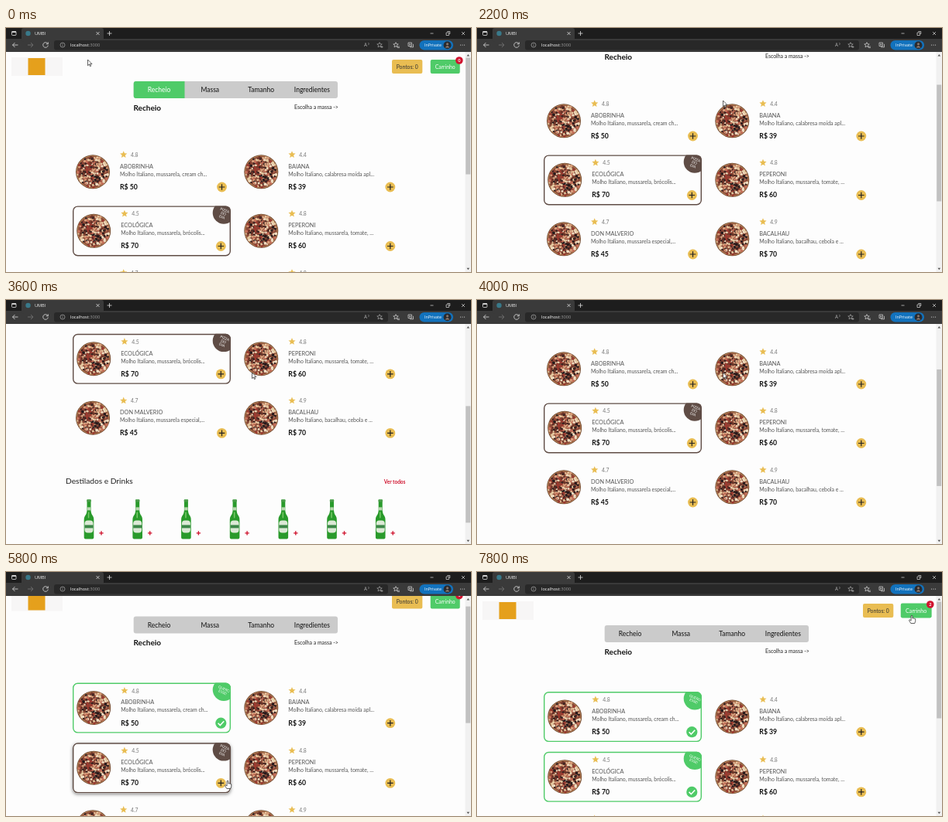
These frames come from a looping animation (600x316 px, 8000 ms). An HTML page:

```html
<!DOCTYPE html>
<html lang="pt-BR">
<head>
<meta charset="utf-8">
<title>Pizzaria</title>
<style>
html, body { margin: 0; width: 100%; height: 100%; overflow: hidden; background: #fdfdfd; }
svg { display: block; width: 100%; height: 100%; font-family: Lato, "Open Sans", sans-serif; }
.ui { font-family: "Open Sans", "Noto Sans", sans-serif; }
</style>
</head>
<body>
<svg viewBox="0 0 600 316">
  <defs id="defs"></defs>
  <g id="page"></g>
  <g id="chrome" class="ui"></g>
  <g id="pointer"></g>
</svg>
<script>
const LOOP = 8000, STEP = 200;
const BROWN = '#5f4c45', GREEN = '#4fcb68', GOLD = '#e9bd52', RED = '#d0142f';
const FIRST_PICK = 5200, SECOND_PICK = 6200;
const CARD = { width: 204, height: 65, radius: 6.5 };

const MENU = [
  ['ABOBRINHA', 'mussarela, cream ch...', 50, 4.8], ['BAIANA', 'calabresa moída apl...', 39, 4.4],
  ['ECOLÓGICA', 'mussarela, brócolis...', 70, 4.5], ['PEPERONI', 'mussarela, tomate, ...', 60, 4.8],
  ['DON MALVERIO', 'mussarela especial,...', 45, 4.7], ['BACALHAU', 'bacalhau, cebola e ...', 70, 4.9]
];
const DRINK_PRICES = [8, 39, 70, 60, 45, 70, 70];

// Keyframes: [time, value, ...]
const SCROLL = [[1900, 0], [2200, 66], [2700, 209], [3500, 209], [4000, 97], [4400, 11.5], [6600, 11.5], [7000, 0]];
const POINTER = [[400, 105.5, 41], [1400, 317.5, 94], [4200, 317.5, 94], [4700, 284.5, 192.5], [4800, 284.5, 192.5],
  [5000, 280, 193], [5300, 280, 193], [5700, 286, 270], [6400, 286, 270], [7300, 561, 56]];
const HOVER = {
  0: [[4800, 0], [5000, .8], [5400, .8], [5700, 0]],
  1: [[4400, 0], [4600, .5], [4800, .3], [5000, 0]],
  2: [[5400, 0], [5700, 1], [6500, 1], [6800, 0]]
};

function track(keys, time) {
  const next = keys.findIndex(k => k[0] > time);
  if (next === 0) return keys[0].slice(1);
  if (next < 0) return keys[keys.length - 1].slice(1);
  const a = keys[next - 1], b = keys[next];
  const p = (time - a[0]) / (b[0] - a[0]);
  return a.slice(1).map((v, i) => v + (b[i + 1] - v) * p);
}

// Text is placed by its vertical middle.
const text = (x, y, size, fill, str, extra = '') =>
  `<text x="${x}" y="${y + size * .36}" font-size="${size}" fill="${fill}" ${extra}>${str}</text>`;
const rect = (x, y, w, h, fill, r = 0, extra = '') =>
  `<rect x="${x}" y="${y}" width="${w}" height="${h}" rx="${r}" fill="${fill}" ${extra}/>`;
const circle = (x, y, r, fill, extra = '') => `<circle cx="${x}" cy="${y}" r="${r}" fill="${fill}" ${extra}/>`;
const line = (d, color, width = .8, extra = '') =>
  `<path d="${d}" fill="none" stroke="${color}" stroke-width="${width}" ${extra}/>`;
const use = (id, x, y) => `<use href="#${id}" x="${x}" y="${y}"/>`;
const BOLD = 'font-weight="700"', MID = 'text-anchor="middle"';

function starPath(r) {
  const points = Array.from({ length: 10 }, (_, i) => {
    const a = i * Math.PI / 5, d = i % 2 ? r * .45 : r;
    return `${(Math.sin(a) * d).toFixed(2)} ${(-Math.cos(a) * d).toFixed(2)}`;
  });
  return `M${points.join('L')}Z`;
}

// Toppings lie on a sunflower spiral, so they spread evenly; the seed only jitters them.
function pizza() {
  let seed = 11;
  const random = () => (seed = seed * 16807 % 2147483647) / 2147483647;
  const colors = ['#241a1c', '#e6c9a0', '#9c3a30', '#d9a07c', '#3a2422', '#c4705a', '#efdcc0', '#6b3428'];
  let out = circle(0, 0, 22, '#6b4630') + circle(0, 0, 21.2, '#b98355') + circle(0, 0, 20.2, '#8a4a38');
  for (let i = 0; i < 190; i++) {
    const a = i * 2.4 + random() * .4, d = Math.sqrt(i / 190) * 20;
    const color = colors[Math.floor(random() * colors.length)];
    out += circle((Math.cos(a) * d).toFixed(1), (Math.sin(a) * d).toFixed(1), (.9 + random() * 1.1).toFixed(1), color);
  }
  return out;
}

function bottle() {
  return '<path d="M-2.5 0H2.5V14Q3 19 5 21Q6.3 23 6.3 26V49Q6.3 51 4.5 51H-4.5Q-6.3 51-6.3 49V26Q-6.3 23-5 21Q-3 19-2.5 14Z" fill="#299a2b"/>' +
    rect(-2.7, 0, 5.4, 3, '#4b9c4a', 1) + rect(-2.2, 10, 4.4, 4, '#b9d8b0') +
    rect(-1.2, 16, 1.5, 8, '#78c968', .7) + rect(-5.5, 27, 11, 16, '#dce9d6', 4) + rect(-5.5, 33, 11, 4, '#3c8748');
}

function card(index, top, bordered, picked, time) {
  const [name, toppings, price, rating] = MENU[index];
  const column = index % 2, dx = column * 217.3;
  const own = picked || index === 2;
  const left = 86 + dx, cardTop = top + (own ? .6 : 0), height = own ? CARD.height : 62.5;
  const mid = top + 24.5 + (bordered ? 1.2 : 0);
  const x = 147 + dx + (own ? 1.2 : 0), buttonX = 278.5 + dx - (own ? 1.2 : 0);
  const shadow = HOVER[index] ? track(HOVER[index], time)[0] : 0;
  const color = picked ? GREEN : BROWN;
  let out = '';
  if (shadow) out += rect(left, cardTop, CARD.width, height, '#fff', own ? CARD.radius : 2, `filter="url(#shadow)" opacity="${shadow}"`);
  if (own) {
    const lines = picked ? ['QUERO', 'ESSE!'] : ['PIZZA', 'DO', 'DIA'];
    const label = lines.map((s, i) => text(0, (i - (lines.length - 1) / 2) * 4.7, 4.5, '#fff', s, MID)).join('');
    const frame = (fill, extra) => rect(.7, .7, CARD.width - 1.4, CARD.height - 1.4, fill, CARD.radius - .7, extra);
    out += `<g transform="translate(${left} ${cardTop})">` + frame('#fdfdfd') +
      `<g clip-path="url(#cardClip)">${circle(195, 9, 14.3, color)}</g>` +
      `<g transform="translate(194.5 10) rotate(23)">${label}</g>` +
      frame('none', `stroke="${color}" stroke-width="1.4"`) + '</g>';
  }
  out += use('pizza', x - 35, mid + 7.3) + use('star', x + 4.7, mid - 15) +
    text(x + 14, mid - 14.6, 6.8, '#777', rating.toFixed(1)) +
    text(x, mid, 7.3, '#555', name) +
    text(x, mid + 10.3, 6.9, '#555', 'Molho Italiano, ' + toppings) +
    text(x, mid + 26.8, 8.7, '#111', 'R$ ' + price, BOLD);
  const by = mid + 27;
  return out + (picked
    ? circle(buttonX, by, 7.1, GREEN) + line(`M${buttonX - 3.7} ${by}l2.7 2.8 4.9-5.2`, '#fff', 1.6)
    : circle(buttonX, by, 6.4, GOLD) + line(`M${buttonX - 3.8} ${by}h7.6m-3.8-3.8v7.6`, '#222', 1.2));
}

function header(time) {
  const chosen = time >= FIRST_PICK;
  const count = (time >= FIRST_PICK) + (time >= SECOND_PICK);
  const grow = time >= 7400 ? 1.05 : 1;
  let out = rect(7, 38, 66, 24, '#f7f6f6') + rect(28.5, 39, 22, 22, '#e5a01c') +
    rect(498, 41, 39.3, 18, GOLD, 2) + text(517.7, 50.2, 6.8, '#333', 'Pontos: 0', MID) +
    `<g transform="translate(566.7 50) scale(${grow})">` + rect(-19, -9, 38, 18, GREEN, 2) +
    text(0, .2, 6.8, '#fff', 'Carrinho', MID) + '</g>' +
    circle(584.8, 42, 4.8, RED) + text(584.8, 42, 5.5, '#fff', count, `${MID} ${BOLD}`) +
    rect(164.7, 69, 263.3, 22, '#cbcbcb', 3);
  if (!chosen) out += '<path d="M230.500 69V91H167.700Q164.700 91 164.700 88V72Q164.700 69 167.700 69Z" fill="' + GREEN + '"/>';
  ['Recheio', 'Massa', 'Tamanho', 'Ingredientes'].forEach((s, i) => {
    out += text(197.5 + i * 65.8, 80, 8.5, i || chosen ? '#111' : '#fff', s, MID);
  });
  return out + text(164.5, 103, 10, '#111', 'Recheio', BOLD) + text(372, 103, 6.9, '#222', 'Escolha a massa -&gt;');
}

function drinks() {
  let out = text(77, 420.5, 10.2, '#222', 'Destilados e Drinks') + text(487.7, 422.5, 6.5, RED, 'Ver todos', BOLD);
  DRINK_PRICES.forEach((price, i) => {
    const x = 77 + i * 62.7;
    out += use('bottle', x + 30, 445) + line(`M${x + 43.3} 488.500h5.400m-2.700-2.700v5.400`, RED, 1.4) +
      text(x, 508, 7.9, '#666', 'R$ ' + price, BOLD) + text(x, 518.5, 5.7, '#666', 'Haldvern');
  });
  return out;
}

function page(time) {
  const [scroll] = track(SCROLL, time);
  const picked = [time >= FIRST_PICK, false, time >= SECOND_PICK];
  let out = header(time) + drinks(), top = 154.5;
  for (let row = 0; row < 3; row++) {
    const bordered = row === 1 || (row === 0 && picked[0]);
    for (const i of [row * 2, row * 2 + 1]) out += card(i, top, bordered, picked[i], time);
    top += 75.3 + (bordered ? 2.4 : 0);
  }
  return `<g transform="translate(0 ${-scroll})">${out}</g>` +
    rect(592.5, 30, 7.5, 286, '#f1f1f1') + rect(593.2, 38.5 + scroll * .53, 6, 151, '#c1c1c1') +
    '<path d="M594.500 36.500l1.800-2.400 1.800 2.400zM594.500 310.800l1.800 2.400 1.800-2.400z" fill="#555"/>';
}

function pointer(time) {
  const [x, y] = track(POINTER, time);
  const hand = (time >= 5000 && time < 6600) || time >= 7200;
  const shape = hand
    ? 'M-.9.8Q0-.6.900.8V4L2.200 3.800 3.400 4.300 4.700 4.800V7.500L3.800 10.500H-1.200L-3.400 6.800Q-3.500 5.500-2.200 5.900L-.9 7Z'
    : 'M0 0V7.700L1.800 6 3 8.700 4.200 8.200 3 5.600H5.500Z';
  return `<path transform="translate(${x} ${y})" d="${shape}" fill="#fff" stroke="#222" stroke-width=".7" stroke-linejoin="round"/>`;
}

function chrome() {
  const ink = '#ddd', dim = '#aaa';
  const star = (x, color) => `<path transform="translate(${x} 22)" d="${starPath(3.4)}" fill="none" stroke="${color}" stroke-width=".7"/>`;
  return rect(0, 0, 600, 14.5, '#1d1d1d') + rect(0, 14, 600, 17, '#3a3a3a') +
    rect(20, 0, 106, 18, '#3a3a3a', 3) + rect(62, 16, 431, 12.5, '#282828', 3) +
    rect(7.5, 4.5, 5.5, 5, 'none', 1, `stroke="${ink}" stroke-width=".8"`) + rect(7.5, 4.3, 5.5, 1.6, ink) +
    circle(28.5, 7, 3.2, '#39798a') + text(37, 7, 5.6, '#eee', 'UMBI') +
    line('M116.500 5l4 4m0-4l-4 4M130.500 7h6m-3-3v6', ink) +
    line('M547.500 7h4M588 5l4 4m0-4l-4 4M568 6h3.500v3.500h-3.500zM569.300 4.500h3.500v3.500', ink, .7) +
    line('M15.500 22h-7m3-3l-3 3 3 3', ink) + line('M28 22h7m-3-3l3 3-3 3', '#777') +
    line('M54 20.500a3.300 3.300 0 1 0 .3 2M54.300 18.300v2.500h-2.500', ink) +
    circle(73, 22, 3, 'none', `stroke="${dim}" stroke-width=".7"`) + line('M73 21.500v2M73 20v.7', dim, .7) +
    text(83, 22.2, 5.7, '#fff', 'localhost<tspan fill="#999">:3000</tspan>') +
    text(462, 22.2, 6.2, dim, 'A') + line('M467.500 19q1.500 1.500 0 3', dim, .6) +
    star(482, dim) + star(503, ink) + line('M485 23v3m-1.500-1.500h3', dim, .7) + line('M505 24h3m-3 1.500h3', ink, .6) +
    line('M519 19h4.500v4.500h-4.500zM521 24.800h4.500v-4', ink, .7) + line('M521.200 20v2.500m-1.200-1.200h2.500', ink, .6) +
    rect(533.5, 16, 43.5, 12.5, '#1272bd', 6.2) + text(540, 22.2, 5.3, '#fff', 'InPrivate') +
    circle(569.5, 22.2, 5, '#292b30') + circle(569.5, 20.8, 1.5, '#8d786d') +
    '<path d="M566.500 25.500Q569.500 20.500 572.500 25.500Z" fill="#8d786d"/>' +
    [586.5, 589, 591.5].map(x => circle(x, 22, .6, ink)).join('');
}

const byId = id => document.getElementById(id);
byId('defs').innerHTML = `<g id="pizza">${pizza()}</g><g id="bottle">${bottle()}</g>` +
  `<path id="star" d="${starPath(4.8)}" fill="${GOLD}"/>` +
  `<clipPath id="cardClip">${rect(0, 0, CARD.width, CARD.height, '#fff', CARD.radius)}</clipPath>` +
  '<filter id="shadow" x="-10%" y="-20%" width="120%" height="150%"><feDropShadow dx="0" dy="1.5" stdDeviation="2" flood-opacity=".5"/></filter>';
byId('chrome').innerHTML = chrome();

let shown = -1;
function draw(now) {
  const time = Math.floor(now % LOOP / STEP) * STEP;
  if (time !== shown) {
    shown = time;
    byId('page').innerHTML = page(time);
    byId('pointer').innerHTML = pointer(time);
  }
  requestAnimationFrame(draw);
}
draw(performance.now());
</script>
</body>
</html>
```
